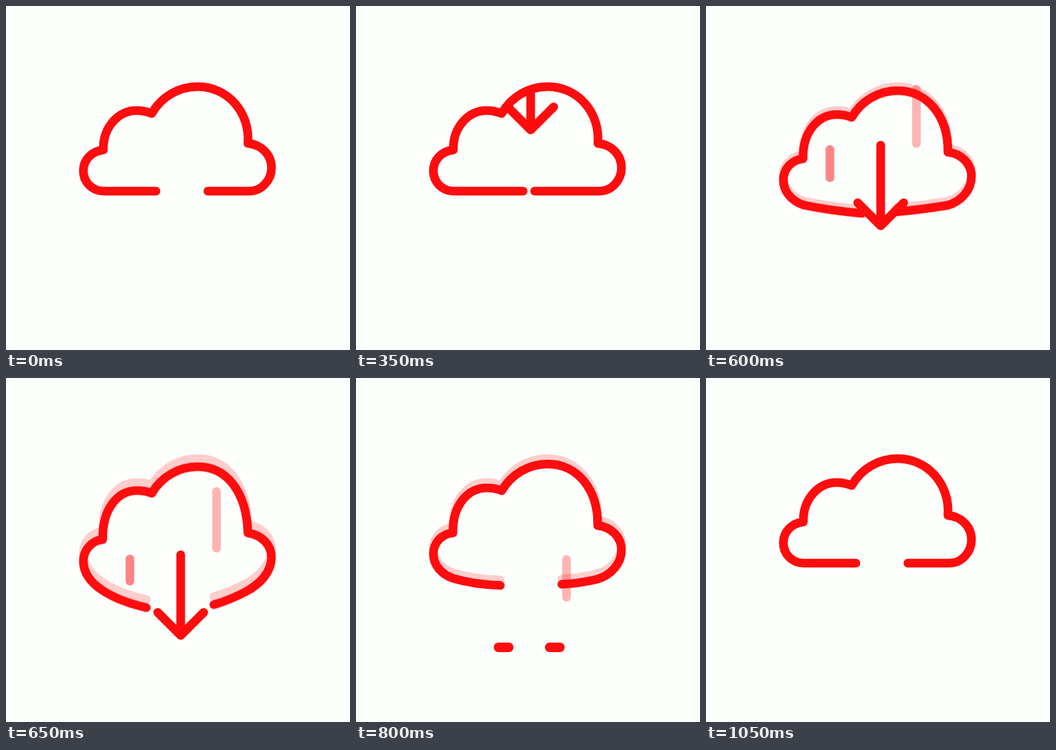
An HTML page without scripts for the animation above (1100 ms loop, 576 px wide and 576 px high).

```html
<!DOCTYPE html>
<html lang="en">
<head>
<meta charset="utf-8">
<title>Cloud download</title>
<style>
  :root {
    --rest: path("M251 310C222 310 192 310 163.5 310C144.7 310 129.5 295 129.5 276C129.5 258 143 243 163 241C162 203 188 175 219 175C228 175 236 177 244 180C260 152 289 135 321 135C371 135 409 178 405 230C428 232 444.5 249 444.5 271C444.5 292 428 310 407 310C384 310 361 310 338 310");
    --shut: path("M288 310C246 310 205 310 163.5 310C144.7 310 129.5 295 129.5 276C129.5 258 143 243 163 241C162 203 188 175 219 175C228 175 236 177 244 180C260 152 289 135 321 135C371 135 409 178 405 230C428 232 444.5 249 444.5 271C444.5 292 428 310 407 310C367 310 327 310 288 310");
    --torn: path("M235 371C209 365 183 356 163 343C141 329 129.5 312 129.5 293C129.5 276 142 259 162 257C161 204 188 175 219 175C228 175 236 176 244 179.5C260 152 289 135 321 135C371 135 403 179 405 246C428 249 444.5 266 444.5 287C444.5 311 426 331 402 344C385 353 366 361 348 366");
    --sag: path("M237 354C210 352 184 346 163 335C141 324 129.5 308 129.5 290C129.5 273 142 257 162 255C161 203 188 175 219 175C228 175 236 176 244 179.5C260 152 289 135 321 135C371 135 404 178 404.5 242C428 245 444.5 262 444.5 283C444.5 307 426 327 402 337C385 344 366 349 348 351");
    --lift: path("M251 307C222 308 192 309 163.5 310C144.7 310 129.5 295 129.5 276C129.5 258 143 243 163 241C162 203 188 175 219 175C228 175 236 177 244 180C260 152 289 135 321 135C371 135 409 178 405 230C428 232 444.5 249 444.5 271C444.5 292 428 310 407 310C384 309.5 361 308.5 338 307");
  }
  html, body { margin: 0; height: 100%; overflow: hidden; background: #fdfffc; }
  svg { display: block; width: 100%; height: 100%; }
  path {
    fill: none; stroke: #ff0c0e; stroke-width: 14.5;
    stroke-linecap: round; stroke-linejoin: round;
  }
  .cloud, .drop, .arrow, .streak, .ground { animation: 1.1s step-end infinite; }
  .cloud { animation-name: cloud; }
  .drop { animation-name: drop; }
  .arrow { animation-name: arrow; }
  .left { animation-name: left; }
  .right { animation-name: right; }
  .ground { stroke-width: 16; }
  .west { animation-name: west; }
  .east { animation-name: east; }
  .ghost { opacity: .2; }

  /* The clock ticks every 50 ms, so each stretch is cut into steps. */
  @keyframes cloud {
    0% { d: var(--rest); animation-timing-function: steps(9); }
    40.9% { d: var(--shut); }
    49.99% { d: var(--shut); animation-timing-function: steps(2); }
    59.08% { d: var(--torn); animation-timing-function: steps(2); }
    68.17% { d: var(--sag); animation-timing-function: steps(3); }
    81.81% { d: var(--lift); }
    86.35%, 100% { d: var(--rest); }
  }
  @keyframes drop {
    0% { transform: translateY(0); }
    49.99% { transform: translateY(0); animation-timing-function: steps(2); }
    59.08% { transform: translateY(13.5px); }
    68.17% { transform: translateY(13.5px); animation-timing-function: steps(3); }
    81.81%, 100% { transform: translateY(0); }
  }
  @keyframes arrow {
    0% { transform: translateY(75px); animation-timing-function: steps(4); }
    18.18% { transform: translateY(151px); animation-timing-function: steps(6); }
    45.45% { transform: translateY(264px); }
    49.99% { transform: translateY(305px); animation-timing-function: steps(2); }
    59.08% { transform: translateY(431px); animation-timing-function: steps(2); }
    68.17% { transform: translateY(548px); }
    72.72%, 100% { transform: translateY(620px); }
  }
  @keyframes left {
    0% { opacity: 0; d: path("M207.5 115L207.5 115"); }
    40.9% { opacity: .5; d: path("M207.5 115L207.5 122"); }
    45.45% { opacity: .5; d: path("M207.5 115L207.5 183"); animation-timing-function: steps(3); }
    59.08% { opacity: .5; d: path("M207.5 303L207.5 340"); }
    63.63%, 100% { opacity: 0; d: path("M207.5 340L207.5 340"); }
  }
  @keyframes right {
    0% { opacity: 0; d: path("M352 38L352 38"); }
    40.9% { opacity: .3; d: path("M352 38L352 66"); }
    45.45% { opacity: .3; d: path("M352 38L352 121"); animation-timing-function: steps(3); }
    59.08% { opacity: .3; d: path("M352.5 190L352.5 285"); animation-timing-function: steps(2); }
    68.17% { opacity: .3; d: path("M352.5 266L352.5 367"); animation-timing-function: steps(2); }
    77.26% { opacity: .3; d: path("M352.5 342L352.5 367"); }
    81.81%, 100% { opacity: 0; d: path("M352.5 367L352.5 367"); }
  }
  @keyframes west {
    0% { opacity: 0; d: path("M291.5 451L291.5 451"); }
    68.17% { opacity: 1; d: path("M291.5 451L266 451"); animation-timing-function: steps(3); }
    81.81% { opacity: 1; d: path("M184 451L184 451"); }
    86.35%, 100% { opacity: 0; d: path("M184 451L184 451"); }
  }
  @keyframes east {
    0% { opacity: 0; d: path("M291.5 451L291.5 451"); }
    68.17% { opacity: 1; d: path("M291.5 451L317 451"); animation-timing-function: steps(3); }
    81.81% { opacity: 1; d: path("M390 451L390 451"); }
    86.35%, 100% { opacity: 0; d: path("M390 451L390 451"); }
  }
</style>
</head>
<body>
<svg viewBox="0 0 576 576">
  <clipPath id="shaft">
    <path d="M230 443V200L244 180C260 152 289 135 321 135C340 135 350 138 360 145V443Z"/>
  </clipPath>
  <path class="cloud ghost"/>
  <path class="streak left"/>
  <path class="streak right"/>
  <g class="drop"><path class="cloud"/></g>
  <g clip-path="url(#shaft)">
    <path class="arrow" d="M292.5 -135V0M254 -38.5L292.5 0L331 -38.5"/>
  </g>
  <path class="ground west"/>
  <path class="ground east"/>
</svg>
</body>
</html>
```
